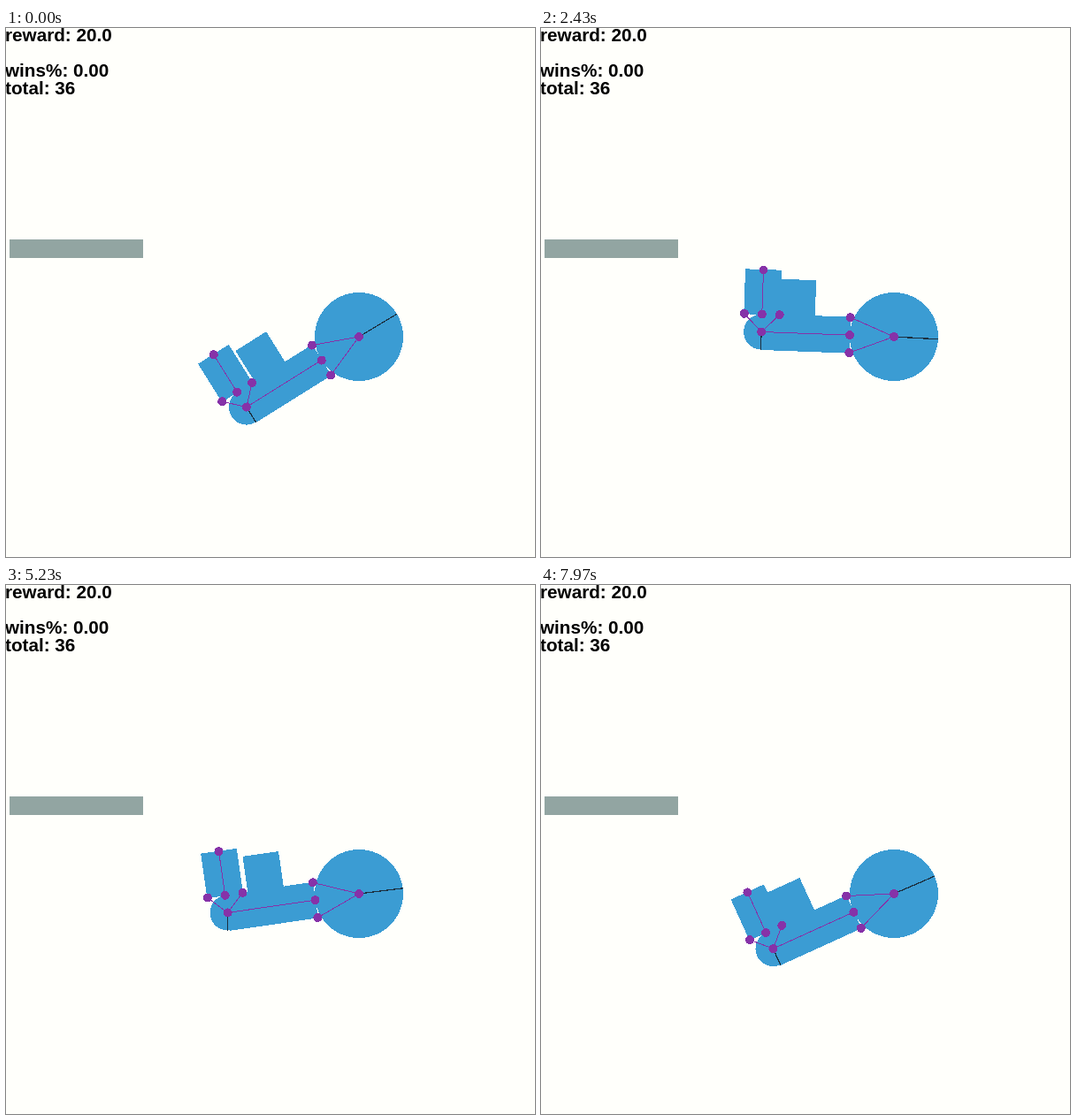
Write an HTML page that moves like this. It is 598 by 598 pixels and loops after 8 s.

```html
<!DOCTYPE html>
<html lang="en">
<head>
<meta charset="utf-8">
<title>Jointed arm</title>
<style>
  html, body { margin: 0; width: 100%; height: 100%; overflow: hidden; background: #fffffb; }
  svg { display: block; }
  text { font: bold 20.7px "Liberation Sans", Arial, sans-serif; }
  .body { fill: #3b9cd3; }
  rect.body { stroke: #3b9cd3; }
  .spoke { stroke: #1c2f3f; stroke-width: 1.3; }
  .joint { fill: none; stroke: #8632a8; marker-start: url(#dot); marker-mid: url(#dot); marker-end: url(#dot); }
</style>
</head>
<body>
<svg width="598" height="598" viewBox="0 0 598 598">
  <marker id="dot" markerUnits="userSpaceOnUse" markerWidth="10" markerHeight="10" refX="5" refY="5">
    <circle cx="5" cy="5" r="5" fill="#8632a8" shape-rendering="crispEdges"/>
  </marker>
  <text x="-1" y="15">reward: 20.0</text>
  <text x="-1" y="55">wins%: 0.00</text>
  <text x="-1" y="75">total: 36</text>

  <g shape-rendering="crispEdges">
    <rect x="4" y="239" width="151" height="21" fill="#92a5a2"/>
    <!-- The hub is the origin; the arm swings around it. -->
    <g transform="translate(399 349)">
      <circle class="body" r="50"/>
      <g id="arm">
        <path class="spoke" d="M0 0H50" transform="rotate(1.1)"/>
        <rect class="body" x="-150" y="-20" width="100" height="40"/>
        <rect class="body" id="block" x="-130" y="-60" width="40" height="40"/>
        <g transform="translate(-150 0)">
          <circle class="body" r="20"/>
          <path class="spoke" id="knee" d="M0 0V20.5"/>
          <g id="flap">
            <rect class="body" x="-20" y="-70" width="40" height="50"/>
            <path class="joint" d="M-20 -20L0 0L20 -20"/>
            <path class="joint" d="M0 -70V-20"/>
          </g>
        </g>
        <path class="joint" d="M-50 -20L0 0L-50 20"/>
        <path class="joint" d="M-150 0H-50"/>
      </g>
    </g>
  </g>
</svg>
<script>
const LOOP = 8000, FPS = 30;
const part = id => document.getElementById(id);
const arm = part('arm'), block = part('block'), flap = part('flap'), knee = part('knee');

// Smooth step from 0 to 1 between two times.
function ease(t, from, to) {
  const x = Math.min(1, Math.max(0, (t - from) / (to - from)));
  return x * x * (3 - 2 * x);
}

// Damped oscillation that is 1 at x = 0.
const ring = (x, period, decay) => Math.exp(-x / decay) * Math.cos(2 * Math.PI * x / period);

// Springy step from 0 to 1 that overshoots and comes to rest.
const settle = (t, start, period, decay) => 1 - ring(Math.max(0, t - start), period, decay);

const bump = (t, center, width) => Math.exp(-(((t - center) / width) ** 2));

// Angles are in degrees, counterclockwise.
function armAngle(t) {
  const drop = 25.8 * ease(t, 1650, 2480) - 3 * ease(t, 2500, 3100);
  const lift = 7 * settle(t, 3330, 1300, 800);
  const swing = 6.9 * ease(t, 5850, 6670) + 8.9 * settle(t, 6690, 860, 600);
  return 23.4 + 8.4 * ring(t - 100, 1100, 500) - drop + lift + swing;
}

const flapLean = t => 7.2 * bump(t, 870, 200) + 4.5 * bump(t, 2620, 100);
const kneeTurn = t => 0.7 * flapLean(t) - 9 * bump(t, 5230, 1500);
const blockSlide = t => 3.7 * ring(t, 1740, 1500) + 6.2 * (ease(t, 3500, 5000) - ease(t, 6900, 7700));

const rotate = (element, degrees) => element.setAttribute('transform', `rotate(${-degrees})`);

function pose(t) {
  rotate(arm, armAngle(t));
  rotate(flap, flapLean(t));
  rotate(knee, kneeTurn(t));
  block.setAttribute('x', -130 + blockSlide(t));
}

function tick(now) {
  const step = Math.floor((now % LOOP) * FPS / 1000 + 0.15);
  pose(Math.min(step * 1000 / FPS, LOOP));
  requestAnimationFrame(tick);
}

pose(0);
requestAnimationFrame(tick);
</script>
</body>
</html>
```
